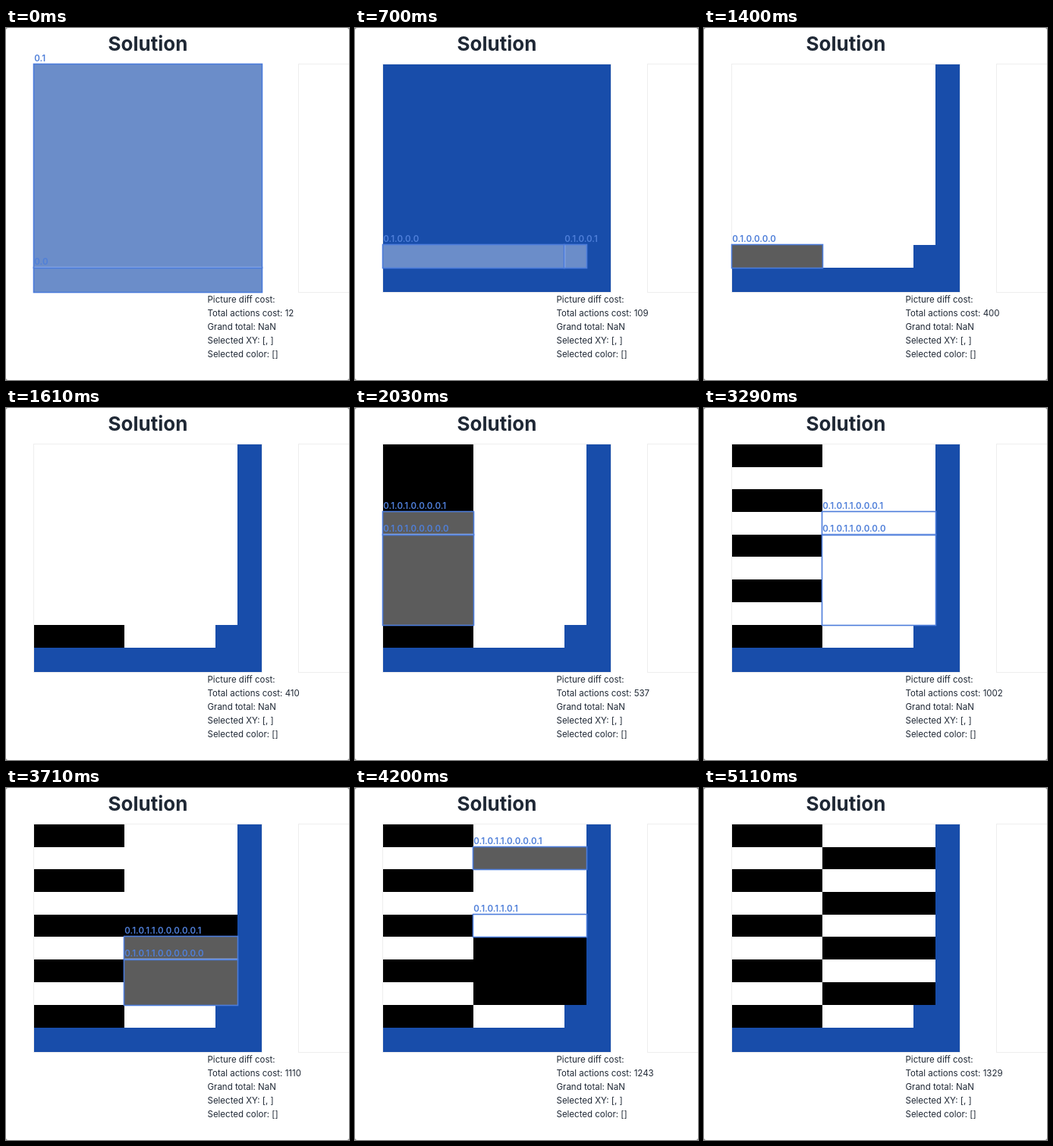
An HTML page that plays this animation: 452 by 464 pixels, repeating every 5530 ms.

```html
<!DOCTYPE html>
<html lang="en">
<head>
<meta charset="utf-8">
<title>Solution</title>
<style>
  html, body { margin: 0; width: 100%; height: 100%; overflow: hidden; background: #8a8a8a; }
  svg { display: block; width: 452px; height: 464px; }
  text { font-family: Inter, "Open Sans", sans-serif; font-size: 11.5px; fill: #1f2835; }
  .title { font-size: 26px; font-weight: 700; text-anchor: middle; }
  .name { font-weight: 600; fill: #4f7fd9; }
  .mark { fill: rgba(255, 255, 255, .36); stroke: #4c7cdb; stroke-width: 1.6; }
  .frame { fill: none; stroke: #eee; }
</style>
</head>
<body>
<svg viewBox="0 0 452 464">
  <rect width="452" height="464" rx="3" fill="#fff"/>
  <text class="title" x="187" y="30">Solution</text>
  <rect class="frame" x="36.5" y="47.5" width="301" height="301"/>
  <rect class="frame" x="385.5" y="47.5" width="301" height="301"/>
  <g id="board" shape-rendering="crispEdges"></g>
  <g id="marks"></g>
  <text x="265.5" y="362">Picture diff cost:</text>
  <text id="cost" x="265.5" y="380"></text>
  <text x="265.5" y="398">Grand total: NaN</text>
  <text x="265.5" y="416">Selected XY: [, ]</text>
  <text x="265.5" y="434">Selected color: []</text>
</svg>
<script>
const BLUE = '#184daa', WHITE = '#fff', BLACK = '#000';
const LOOP = 5530, SIZE = 400;
const LEFT = '0.1.0.1.0', RIGHT = '0.1.0.1.1';

// Cuts down one column, each splitting the lower part left by the one before.
const cuts = (id, rows) => rows.map((y, i) => ['y', id + '.0'.repeat(i), y]);

const column = (id, color) => {
  const low = id + '.0.0.0.0';
  return [
    ...cuts(id, [360, 321, 281, 241]),
    ['color', low, color],
    ...cuts(low, [202, 162, 122]),
    ['swap', low + '.1', id + '.0.1'],
    ['swap', low + '.0.0.1', id + '.0.0.0.1']
  ];
};

const actions = [
  ['y', '0', 43],
  ['x', '0.1', 357],
  ['y', '0.1.0', 82],
  ['x', '0.1.0.0', 318],
  ['color', '0.1.0.0.0', WHITE],
  ['color', '0.1.0.1', WHITE],
  ['x', '0.1.0.0.0', 159],
  ['color', '0.1.0.0.0.0', BLACK],
  ['x', '0.1.0.1', 159],
  ['color', LEFT, BLACK],
  ...column(LEFT, WHITE),
  ...column(RIGHT, BLACK)
];

const PRICE = { x: 7, y: 7, color: 5, swap: 3 };

// Run every action once and keep the picture, marked blocks and cost after each.
let blocks = { 0: { x0: 0, y0: 0, x1: SIZE, y1: SIZE, c: BLUE } };
let total = 5;
const states = actions.map(([kind, id, arg]) => {
  const b = blocks[id];
  total += Math.round(PRICE[kind] * SIZE * SIZE / ((b.x1 - b.x0) * (b.y1 - b.y0)));
  blocks = { ...blocks };
  let marked = [id];
  if (kind === 'color') {
    blocks[id] = { ...b, c: arg };
  } else if (kind === 'swap') {
    const o = blocks[arg];
    blocks[id] = { ...o, c: b.c };
    blocks[arg] = { ...b, c: o.c };
    marked = [id, arg];
  } else {
    delete blocks[id];
    marked = [id + '.0', id + '.1'];
    blocks[marked[0]] = { ...b, [kind + '1']: arg };
    blocks[marked[1]] = { ...b, [kind + '0']: arg };
  }
  return { blocks, marked, cost: total };
});
states.push({ ...states[states.length - 1], cost: total + 25 });

// [time, picture, marks shown, cost taken from this state]
const timeline = [];
const at = (t, pic, on = 1, cost = pic) => timeline.push([t, pic, on, cost]);
const run = (t, from, to) => {
  for (let i = from; i <= to; i++) at(t + (i - from) * 70, i);
};
at(0, 0); at(280, 0, 0); at(350, 0, 0, 1);
at(420, 1); at(490, 1, 0);
at(560, 2); at(630, 2, 0);
at(700, 3); at(770, 3, 0);
run(840, 4, 6);
at(1400, 7); at(1470, 7, 0);
at(1540, 8); at(1610, 8, 0);
at(1680, 9); at(1750, 9, 0);
run(1820, 10, 20);
at(2870, 20, 0); at(2940, 20, 0, 21);
at(3080, 21); at(3150, 21, 0);
run(3220, 22, 23);
at(3360, 23, 0);
run(3570, 24, 27);
at(4130, 28); at(4270, 28, 0); at(4340, 28, 0, 29);
at(4550, 29); at(4690, 29, 0);
at(5110, 29, 0, 30);

const px = x => 37 + Math.round(x * .75);
const py = y => 48 + Math.ceil((SIZE - y) * .75 - .5);

function rect(b, grow, attrs) {
  const x = px(b.x0) - grow, y = py(b.y1) - grow;
  const w = px(b.x1) + grow - x, h = py(b.y0) + grow - y;
  return `<rect x="${x}" y="${y}" width="${w}" height="${h}" ${attrs}/>`;
}

const label = (id, b) =>
  `<text class="name" x="${px(b.x0) + .3}" y="${py(b.y1) - 4}">${id}</text>`;

const $ = id => document.getElementById(id);
let shown = null;

function draw(entry) {
  if (entry === shown) return;
  shown = entry;
  const [, pic, on, cost] = entry;
  const s = states[pic];
  $('board').innerHTML = Object.values(s.blocks)
    .filter(b => b.c !== WHITE)
    .map(b => rect(b, 0, `fill="${b.c}"`)).join('');
  const ids = on ? s.marked : [];
  $('marks').innerHTML =
    ids.map(id => rect(s.blocks[id], .5, 'class="mark"')).join('') +
    ids.map(id => label(id, s.blocks[id])).join('');
  $('cost').textContent = 'Total actions cost: ' + states[cost].cost;
}

const start = performance.now();
function tick() {
  const t = (performance.now() - start) % LOOP;
  let entry = timeline[0];
  for (const e of timeline) if (e[0] <= t) entry = e;
  draw(entry);
  requestAnimationFrame(tick);
}
tick();
</script>
</body>
</html>
```
